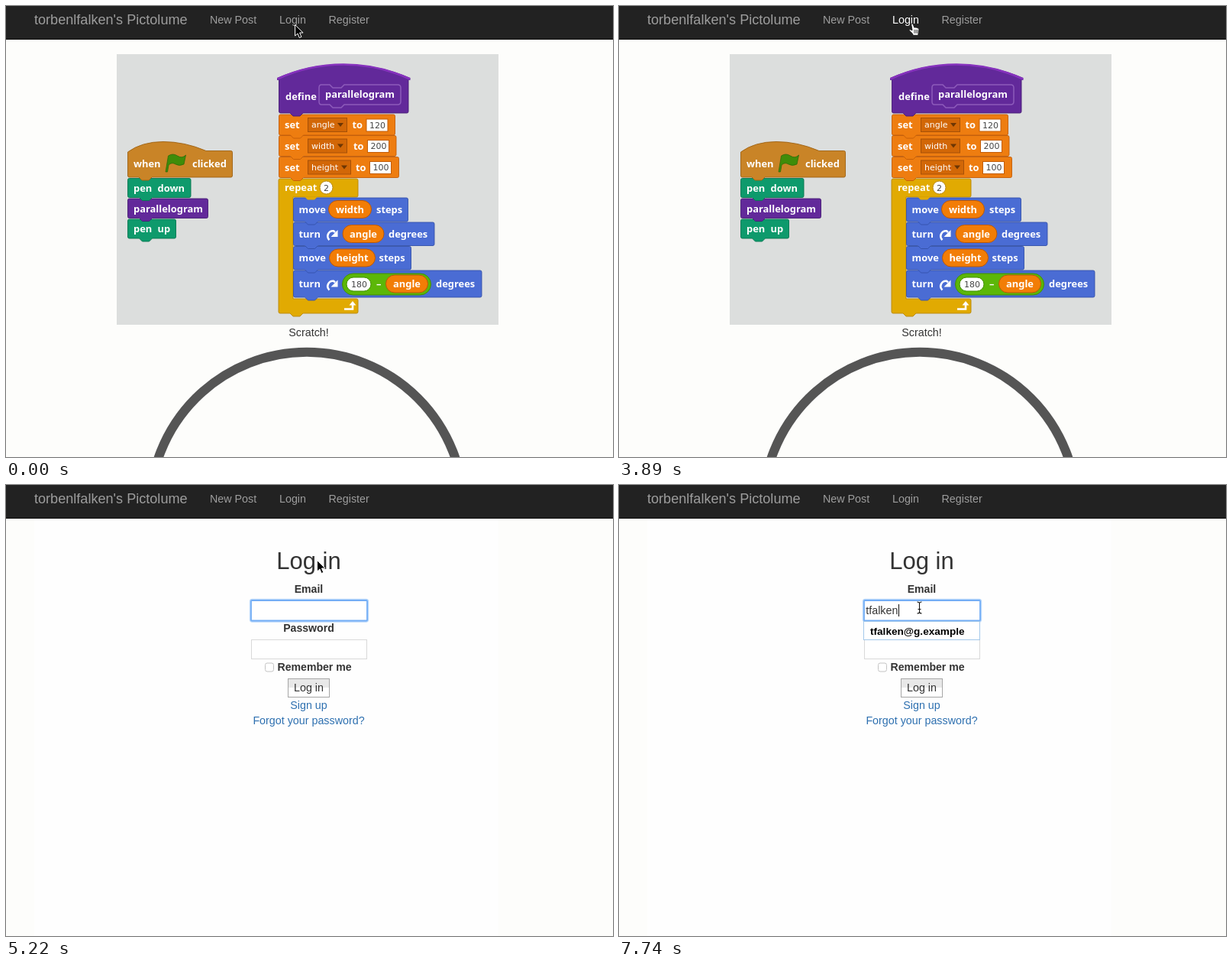
Recreate the animation shown at these times as an HTML page. Size 795 by 590 pixels, loop 8000 ms.

```html
<!DOCTYPE html>
<html lang="en">
<head>
<meta charset="utf-8">
<style>
html, body { margin: 0; width: 100%; height: 100%; overflow: hidden; background: #fdfdfb; }
svg { display: block; }
text { font: 14.3px "Liberation Sans", Arial, sans-serif; fill: #333; white-space: pre; }
.nav text { fill: #9d9d9d; }
.nav .brand { font-size: 18.1px; }
.label { font-size: 14.1px; font-weight: bold; }
.title { font-size: 31px; }
.link { fill: #2e70b0; }
.option { font-size: 13.6px; font-weight: bold; fill: #000; }
.code text { font: bold 12.9px "Noto Sans", "Open Sans", "DejaVu Sans", sans-serif; fill: #fff; word-spacing: 4px; }
.code .small, .code .num { font: 11px "DejaVu Sans", sans-serif; }
.code .num { fill: #444; }
</style>
</head>
<body>
<svg id="stage" width="795" height="590" viewBox="0 0 795 590"></svg>
<script>
const LOOP = 8000;
const ORANGE = ['#ee7d10', '#c25d08'], BLUE = ['#4a6cd4', '#3452aa'], GREEN = ['#0e9a6c', '#087650'];
const PURPLE = ['#62299a', '#471c75'], GOLD = ['#e1aa02', '#b88704'], LIME = ['#5cb708', '#439000'];

const text = (x, y, s, cls = '', more = '') => `<text x="${x}" y="${y}" class="${cls}" ${more}>${s}</text>`;
const centred = (x, y, s, cls) => text(x, y, s, cls, 'text-anchor="middle"');
const rect = (x, y, w, h, fill, more = '') => `<rect x="${x}" y="${y}" width="${w}" height="${h}" fill="${fill}" ${more}/>`;
const path = (d, fill, more = '') => `<path d="${d}" fill="${fill}" ${more}/>`;
const outlined = (d, [fill, edge]) => path(d, fill, `stroke="${edge}" stroke-width=".9" stroke-linejoin="round"`);
const tab = x => `H${x + 32}l-4 4h-9l-4-4`;

function block(x, y, w, h, colors) {
  return outlined(`M${x + 2} ${y}H${x + w - 2}q2 0 2 2V${y + h - 2}q0 2-2 2${tab(x)}H${x + 2}q-2 0-2-2V${y + 2}q0-2 2-2Z`, colors);
}
function pill(x, y, w, h, [fill, edge]) {
  return rect(x, y, w, h, fill, `rx="${h / 2}" stroke="${edge}"`);
}
function variable(x, y, w, name) {
  return pill(x, y, w, 23, ['#f27d06', '#b85808']) + centred(x + w / 2, y + 16.2, name);
}
function setBlock(y, w, name, menu, to, value) {
  const arrow = 395 + menu - 12;
  return block(357.5, y, w, 27, ORANGE) + text(365, y + 18, 'set')
    + rect(395.5, y + 4.5, menu, 18, '#d26707', 'stroke="#a65108"')
    + text(400, y + 17, name, 'small')
    + path(`M${arrow} ${y + 11}h8l-4 5Z`, '#6d3604')
    + text(to, y + 18, 'to')
    + rect(to + 18.5, y + 6, 28, 16, '#fff', 'stroke="#c25d08"')
    + centred(to + 33, y + 17.5, value, 'num');
}
function turnIcon(y) {
  return `<g transform="translate(416 ${y})">`
    + path('M7.5 15.5A6.8 6.8 0 0 1 13 3.8L15 5.5', 'none', 'stroke="#fff" stroke-width="2.6"')
    + path('M18.5 2.5V11.5H9.5Z', '#fff') + '</g>';
}

function mainScript() {
  const cBlock = `M359 226H459q2 0 2 2V248q0 2-2 2H376V383H459q2 0 2 2V400q0 2-2 2${tab(357)}H359q-2 0-2-2V228q0-2 2-2Z`;
  return outlined(cBlock, GOLD)
    + path('M443 396.5H454V391', 'none', 'stroke="#fff" stroke-width="2.6"')
    + path('M449.5 391.5L454 386l4.5 5.5Z', '#fff')
    + block(376.5, 346, 246.5, 35, BLUE) + text(383.5, 368, 'turn') + turnIcon(356)
    + pill(440.5, 350, 116, 28, LIME) + pill(446, 355, 32, 18, ['#fff', '#439000'])
    + centred(462.5, 368, '180', 'num') + text(485, 368, '–') + variable(497.5, 352, 55, 'angle') + text(563, 368, 'degrees')
    + block(376.5, 314.5, 154, 30.5, BLUE) + text(383.5, 334, 'move')
    + variable(423.5, 318, 60, 'height') + text(488.5, 334, 'steps')
    + block(376.5, 283, 184.5, 30.5, BLUE) + text(383.5, 303, 'turn') + turnIcon(290.5)
    + variable(441, 286.5, 54, 'angle') + text(501, 303, 'degrees')
    + block(376.5, 251, 150, 31, BLUE) + text(383.5, 271, 'move')
    + variable(422.5, 254.5, 56, 'width') + text(485, 271, 'steps')
    + path('M391 249.5h17l-4 4h-9Z', GOLD[0])
    + text(365, 242, 'repeat') + pill(411, 229, 17, 17, ['#fff', '#b88710']) + centred(419.5, 241.5, '2', 'num')
    + setBlock(197.5, 157, 'height', 56, 458, '100')
    + setBlock(169.5, 153.5, 'width', 51, 455, '200')
    + setBlock(142, 152, 'angle', 51, 453.5, '120')
    + outlined(`M357.5 96H527V138q0 2-2 2${tab(357)}H359.5q-2 0-2-2Z`, PURPLE)
    + path('M355 97V94Q396 76 442 76T529.5 94V97Z', PURPLE[0])
    + path('M355.5 95.5Q396 76.5 442 76.5T529 95.5', 'none', 'stroke="#8632bd" stroke-width="2.6"')
    + path('M413 103H424l4 4h11l4-4H513q4 0 4 4V125q0 4-4 4H443l-4 4H428l-4-4H413q-3 0-3-4V107q0-4 3-4Z', PURPLE[0], 'stroke="#8d5bbb" stroke-width="1.5"')
    + text(366, 123, 'define') + text(418, 120.3, 'parallelogram');
}

function flagScript() {
  return block(159.5, 279, 63, 25, GREEN) + text(167, 296.3, 'pen up')
    + block(159.5, 252, 105, 25.5, PURPLE) + text(167, 269.5, 'parallelogram')
    + block(159.5, 225.5, 82.5, 25, GREEN) + text(167, 243, 'pen down')
    + outlined(`M159.5 191Q178 177.5 206 177.5T262 189.5H294.5q2 0 2 2V222q0 2-2 2${tab(159)}H161.5q-2 0-2-2Z`, ['#c98427', '#9d6113'])
    + text(167, 211.3, 'when')
    + path('M212.5 196q6-4 12 0t11-1l-2.5 12q-6 3-11 0t-9 1l-1.5 9h-2.5Z', '#3f8c09', 'stroke="#28660a" stroke-width=".7"')
    + text(244, 211.3, 'clicked');
}

const feed = rect(145, 63, 500, 354, '#dcdedd')
  + `<g class="code">${flagScript()}${mainScript()}</g>`
  + centred(396.5, 432, 'Scratch!')
  + '<circle cx="394" cy="658.5" r="205.7" fill="none" stroke="#555" stroke-width="12"/>';

const option = (y, s) => text(329, y, s, 'option');
const form = rect(37, 44, 608, 546, '#fefefe')
  + centred(396.5, 110, 'Log in', 'title')
  + centred(396.5, 141, 'Email', 'label')
  + rect(320.5, 150.5, 153, 27.5, '#fff', 'rx="2" stroke="#b9d8fb" stroke-width="3.4"')
  + rect(321, 151, 152, 26.5, '#fff', 'rx="1" stroke="#74aef5" stroke-width="1.8"')
  + centred(396.5, 192, 'Password', 'label')
  + rect(321.5, 202.5, 151, 25, '#fff', 'stroke="#d9d9d9"')
  + rect(339.5, 233, 11, 11, '#fff', 'rx="2.5" stroke="#c4c4c4"')
  + text(355.5, 243, 'Remember me', 'label')
  + rect(369.5, 253.5, 54, 24, '#fff', 'stroke="#a6a6a6"') + rect(370, 254, 53, 11, '#e8e8e8')
  + centred(396.5, 270, 'Log in')
  + centred(396.5, 293, 'Sign up', 'link')
  + centred(396.5, 313, 'Forgot your password?', 'link')
  + `<g id="wideMenu">${rect(320.5, 178.5, 195, 48, '#fff', 'stroke="#a3c8ea"')}${option(195.5, 'tfalken@g.example')}${option(219.5, 'torbenfalken@g.example')}</g>`
  + `<g id="menu">${rect(320.5, 178.5, 152, 24, '#fff', 'stroke="#a3c8ea"')}${option(195.5, 'tfalken@g.example')}</g>`
  + text(323.3, 169, '', '', 'id="typed"')
  + rect(324, 156, 1, 16, '#111', 'id="caret"');

const cursors = {
  arrow: path('M0 0V14.5L3.4 11.5 5.7 17 8.3 15.9 6 10.5H10.5Z', '#000', 'stroke="#fff"'),
  hand: path('M3.2 1.6Q4.4-.3 5.6 1.4L7.3 6Q8.5 4.9 9.3 6Q10.8 5.2 11.3 6.6Q13.4 6.3 13.4 8.5L12.8 12 12.2 16H5.8L4.6 13.4 1 10Q-.2 8.4 1.4 8.2L4.6 9.6Z', '#fff', 'stroke="#111" stroke-width=".8"')
    + path('M7.4 8.5V13.5M9.4 8.5V13.5M11.3 8.5V13.5', 'none', 'stroke="#111" stroke-width=".8"'),
  beam: path('M-3-7.5Q0-7.5 0-5.5Q0-7.5 3-7.5M0-5.5V5.5M-3 7.5Q0 7.5 0 5.5Q0 7.5 3 7.5M-2 2H2', 'none', 'stroke="#111" stroke-width="1.1"')
};

document.getElementById('stage').innerHTML = rect(0, 0, 795, 590, '#fdfdfb')
  + `<g id="feed">${feed}</g><g id="form">${form}</g>`
  + rect(0, 0, 795, 43, '#222') + rect(0, 43, 795, 1, '#080808')
  + `<g class="nav">${text(37, 24, "torbenlfalken's Pictolume", 'brand')}${text(267, 23, 'New Post')}${text(358, 23, 'Login', '', 'id="login"')}${text(422.5, 23, 'Register')}</g>`
  + Object.entries(cursors).map(([kind, shape]) => `<g id="${kind}">${shape}</g>`).join('');

const el = id => document.getElementById(id);
const show = (id, on) => { el(id).style.display = on ? '' : 'none'; };
const at = (track, t) => track.filter(step => step[0] <= t).pop();

const pointer = [
  [0, 'arrow', 378.6, 24.5], [750, 'arrow', 378.3, 23], [1950, 'arrow', 378.6, 21.5],
  [3890, 'hand', 379.5, 22.3], [4040, 'hand', 371, 25.2], [4180, 'hand', 367.8, 26.3],
  [5070, 'arrow', 381.5, 46.5], [5220, 'arrow', 407.5, 98.5], [5360, 'beam', 380, 171],
  [5510, 'arrow', 372.5, 177.5], [5660, 'beam', 393.5, 159.5], [5810, 'beam', 393.5, 160.5]
];
const caretOn = [[0, true], [5220, false], [5810, true], [6260, false], [6700, true]];
const typing = [[0, 0], [7150, 1], [7300, 2], [7450, 3], [7590, 6], [7740, 7]];

function render(t) {
  const loggingIn = t >= 4780;
  show('feed', !loggingIn);
  show('form', loggingIn);
  el('login').style.fill = t >= 3890 && t < 5220 ? '#fff' : '';

  const count = at(typing, t)[1];
  const typed = el('typed');
  typed.textContent = 'tfalken'.slice(0, count);
  el('caret').setAttribute('x', count && loggingIn ? Math.round(323.5 + typed.getComputedTextLength()) : 324);
  show('caret', at(caretOn, t)[1]);
  show('wideMenu', count === 1);
  show('menu', count > 1);

  const [, kind, x, y] = at(pointer, t);
  for (const name in cursors) show(name, name === kind);
  el(kind).setAttribute('transform', `translate(${x} ${y})`);
}

const start = performance.now();
function tick() {
  render((performance.now() - start) % LOOP);
  requestAnimationFrame(tick);
}
tick();
</script>
</body>
</html>
```
